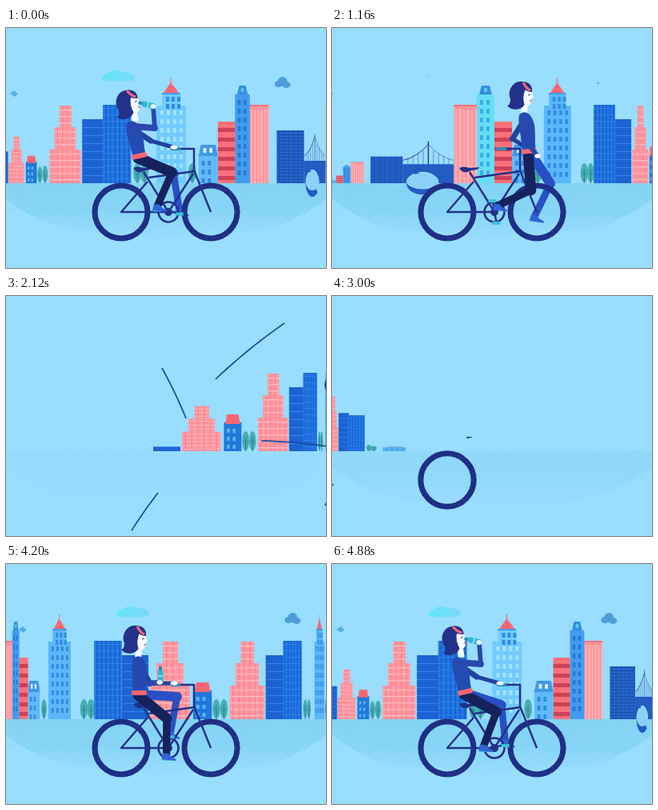
An HTML page with a canvas that plays this animation: 400 by 300 pixels, repeating every 4920 ms.

```html
<!DOCTYPE html>
<html>
<head>
<meta charset="utf-8">
<style>
html, body { margin: 0; width: 100%; height: 100%; overflow: hidden; background: #99ddff; }
canvas { display: block; width: 400px; height: 300px; }
</style>
</head>
<body>
<canvas id="stage" width="400" height="300"></canvas>
<script>
const c = document.getElementById('stage').getContext('2d');
const LOOP = 4920, STEP = 40, GROUND = 194, RING = 205, PERIOD = 797;
const NAVY = '#23318a', BLUE = '#2850c4', INK = '#16225c', RED = '#fa6670', CYAN = '#35c3dd', WHITE = '#f7fbff';

const clamp = (v, a = 0, b = 1) => Math.max(a, Math.min(b, v));
const lerp = (a, b, k) => a + (b - a) * k;
const part = (t, a, b) => clamp((t - a) / (b - a));
const smooth = k => k * k * (3 - 2 * k);
const backOut = k => k <= 0 ? 0 : 1 + 2.7 * (k - 1) ** 3 + 1.7 * (k - 1) ** 2;

function random(seed) {
  return () => (seed = (seed * 16807) % 2147483647) / 2147483647;
}

// Keys are rows of [time, value].
function track(keys, t, curved) {
  let i = 0;
  while (i < keys.length - 2 && t > keys[i + 1][0]) i++;
  const [ta, a] = keys[i], [tb, b] = keys[i + 1];
  const k = part(t, ta, tb);
  if (!curved) return lerp(a, b, k);
  const slope = n => {
    const p = keys[Math.max(0, n - 1)], q = keys[Math.min(keys.length - 1, n + 1)];
    return (q[1] - p[1]) / (q[0] - p[0]) * (tb - ta);
  };
  return lerp(a, b, smooth(k)) + k * (1 - k) * ((1 - k) * slope(i) - k * slope(i + 1));
}

function fill(color, build) {
  c.fillStyle = color;
  c.beginPath();
  build();
  c.fill();
}
function box(color, x, y, w, h) {
  c.fillStyle = color;
  c.fillRect(x, y, w, h);
}
function poly(color, ...p) {
  fill(color, () => { for (let i = 0; i < p.length; i += 2) c.lineTo(p[i], p[i + 1]); });
}
function oval(color, x, y, rx, ry = rx, turn = 0) {
  fill(color, () => c.ellipse(x, y, rx, ry, turn, 0, 7));
}
function line(color, width, ...p) {
  c.strokeStyle = color;
  c.lineWidth = width;
  c.beginPath();
  for (let i = 0; i < p.length; i += 2) c.lineTo(p[i], p[i + 1]);
  c.stroke();
}
function at(x, y, turn, sx, sy, draw) {
  c.save();
  c.translate(x, y);
  c.rotate(turn);
  c.scale(sx, sy);
  draw();
  c.restore();
}

// ---- City: drawn with the ground at y = 0, wrapped on a cylinder ----
function windows(color, x0, x1, top, bottom, gapX, gapY, w, h) {
  for (let y = top; y < bottom; y += gapY)
    for (let x = x0; x < x1; x += gapX) box(color, x, y, w, h);
}
const build = {
  step() {
    const shape = [[0, 50, 0, -42], [8, 42, -42, -70], [16, 35, -70, -97]];
    for (const [a, b, y, top] of shape) {
      box('#ff98a0', a, top, b - a, y - top);
      for (let x = a + 4; x < b; x += 8) box('#ff7b88', x, top, 1.4, y - top);
      for (let h = top + 5; h < y; h += 8) box('#ffb9bd', a, h, b - a, 1.4);
    }
  },
  block(w) {
    box('#2277e6', 0, -98, w, 98);
    for (let x = 3; x < w; x += 6) box('#185fc9', x, -98, 2, 98);
    for (let y = -94; y < 0; y += 8) box('#2f85ee', 0, y, w, .8);
  },
  low(w) {
    box('#1c63d2', 0, -80, w, 80);
    for (let y = -70; y < 0; y += 10) box('#3385eb', 0, y, w, 1);
  },
  tower(w, lit) {
    poly(RED, 9, -113, 18, -126, 28, -113);
    line(RED, 1.2, 18, -124, 18, -131);
    const wall = lit > .5 ? '#70cbff' : '#5bb7fa';
    box(wall, 7, -113, 23, 20);
    box(wall, 0, -97, w, 97);
    box('#3f9cec', 7, -113, 23, 2);
    windows(lit > .5 ? '#a0e2ff' : '#328ce2', 5, w - 3, -91, -5, 8, 11, 4, 6);
    windows('#328ce2', 12, 27, -108, -98, 7, 9, 4, 6);
  },
  house(w) {
    box('#60baf9', 0, -36, w, 36);
    poly('#4098e8', 0, -34, 3, -48, w - 3, -48, w, -34);
    windows('#d4f3ff', 6, 20, -44, -38, 8, 20, 4, 6);
    windows('#318be0', 4, 20, -28, -4, 8, 11, 4, 6);
  },
  cottage(w) {
    box('#2178db', 0, -36, w, 36);
    poly('#f46671', 2, -34, 4, -46, w - 4, -46, w - 2, -34);
    windows('#5cb5f6', 4, 20, -28, -4, 8, 10, 4, 5);
  },
  red(w) {
    box('#fb7079', 0, -77, w, 77);
    for (let y = -69; y < 0; y += 12) box('#cf4058', 0, y, w, 5);
  },
  tall(w, lit) {
    const mix = (a, b) => Math.round(lerp(a, b, lit));
    const wall = `rgb(${mix(66, 100)},${mix(155, 222)},${mix(238, 246)})`;
    box(wall, 0, -111, w, 111);
    poly('#348fe0', 3, -111, 6, -122, w - 6, -122, w - 3, -111);
    box('#5bc8ee', w / 2 - 2, -119, 4, 5);
    windows(lit > .5 ? '#3bafe2' : '#2678d2', 4, w - 3, -104, -5, 8, 11, 4, 6);
  },
  pink(w) {
    box('#ff959c', 0, -98, w, 98);
    for (let x = 2; x < w; x += 5) box('#ffb6bb', x, -92, 2, 92);
    box('#f6717e', 0, -98, w, 2);
  },
  dark(w) {
    box('#1e59bd', 0, -66, w, 66);
    for (let y = -63; y < 0; y += 4) box('#2f71d3', 0, y, w, 1);
    for (let x = 5; x < w; x += 9) box('#194daa', x, -66, 1, 66);
  },
  bridge(w) {
    fill('#235cc2', () => {
      c.rect(0, -28, w, 28);
      c.ellipse(w / 2 - 8, 0, 22, 17, 0, 0, 7, true);
    });
    oval('#8bd1f7', w / 2 - 8, -3, 22, 12);
    box('#235cc2', 0, -28, w, 10);
    line(NAVY, 1.5, w / 2, -28, w / 2, -62);
    c.lineWidth = 1;
    for (const end of [0, w]) {
      c.beginPath();
      c.moveTo(w / 2, -58);
      c.quadraticCurveTo(lerp(w / 2, end, .45), -38, end, -34);
      c.stroke();
      for (let k = .2; k < 1; k += .2) line(NAVY, .5, lerp(w / 2, end, k), -28, lerp(w / 2, end, k), -52 + 18 * k);
    }
  },
  tree(w) {
    oval('#48aeb0', w / 2, -13, w / 2, 12);
    line('#287d9c', 1, w / 2, 0, w / 2, -18);
    line('#287d9c', .7, w / 2 - 3, -14, w / 2, -9, w / 2 + 3, -13);
  }
};
const city = [
  ['bridge', -35, 70], ['dark', -88, 53], ['pink', -130, 29], ['tall', -151, 21], ['red', -174, 23],
  ['house', -199, 25], ['tree', -212, 10], ['tower', -252, 37], ['tree', -272, 10], ['tree', -281, 10],
  ['low', -350, 31], ['block', -321, 37], ['step', -402, 50], ['tree', -415, 10], ['tree', -425, 10],
  ['pink', 35, 29], ['tall', 64, 22], ['red', 86, 22], ['house', 108, 25], ['tree', 136, 10],
  ['tower', 149, 37], ['tree', 200, 11], ['tree', 210, 11], ['block', 220, 37], ['low', 257, 34],
  ['step', 293, 50], ['cottage', 347, 24]
];
const scroll = [[2840, 157], [3560, -91], [4200, -313], [4880, -544.5], [4920, -557], [5440, -712.5],
  [6080, -880], [7040, -1070], [7160, -1091]];
const fallEdge = [[4920, -65], [5440, -65], [6080, -10], [7040, 195], [7160, 300]];
const fallWidth = [[5440, 130], [6080, 155], [7040, 85]];
const riseEdge = [[2840, -10], [3560, 410], [4000, 700]];

function drawCity(T) {
  if (T > 7200) return;
  const shift = track(scroll, T, true);
  const falling = track(fallEdge, T), width = track(fallWidth, T), rising = track(riseEdge, T);
  for (const [kind, u, w] of city) {
    const start = (((u + w / 2 + shift) % PERIOD) + PERIOD * 1.5) % PERIOD - PERIOD / 2 - w / 2;
    const [a, b] = [start, start + w].map(v => 200 + RING * Math.sin(clamp(v / RING, -1.57, 1.57)));
    const mid = (a + b) / 2;
    let h = clamp((rising - mid) / 115);
    if (T > 4400) h *= clamp((mid - falling) / width);
    if (b - a < .5 || h <= 0) continue;
    const lit = 1 - part(Math.abs(mid - 172), 45, 75);
    at(a, GROUND, 0, (b - a) / w, h, () => build[kind](w, lit));
  }
}

function cloud(x, y, w, color, k) {
  if (k <= 0) return;
  at(x, y, 0, w / 40 * k, w / 40 * k, () => {
    oval(color, -4, -1, 10, 6);
    oval(color, 8, 0, 9, 5);
    fill(color, () => c.roundRect(-20, -2, 40, 8, 4));
  });
}
const drift = [[2840, 28], [3560, 0], [4200, -25], [4880, -43], [5440, -53], [6080, -63]];
function drawClouds(T) {
  const d = track(drift, T, true);
  const k = backOut(part(T, 3000, 3300)) * (1 - part(T, 5900, 6110));
  const g = c.createLinearGradient(-20, 0, 20, 0);
  g.addColorStop(0, '#62e6f3');
  g.addColorStop(1, '#7bd7fb');
  cloud(184 + d, 60, 40, g, T < 6100 ? Math.max(k, T > 5900 ? .12 : 0) : 0);
  at(375 + d * .67, 69, 0, k, k, () => {
    oval('#4d9fda', 0, -2, 6, 6);
    oval('#4d9fda', -5, 1, 5, 4);
    oval('#4d9fda', 5, 2, 5, 4);
  });
  const s = T > 5900 ? .4 + .6 * k : k;
  if (T < 6200) at(35 + d * .57, 82, 0, s, s, () => poly('#55aee7', -5, 0, 0, -4, 5, 0, 1, 4));
}

function drawGround(T) {
  c.save();
  c.globalAlpha = part(T, 2840, 3200) * (1 - .88 * part(T, 6760, 7040)) * (1 - part(T, 7040, 7160));
  const g = c.createLinearGradient(0, 194, 0, 262);
  g.addColorStop(0, '#83d3f3');
  g.addColorStop(.5, '#86d5f6');
  g.addColorStop(1, '#99ddff');
  fill(g, () => {
    c.moveTo(0, GROUND);
    c.lineTo(400, GROUND);
    c.lineTo(400, 214);
    c.bezierCurveTo(350, 252, 300, 262, 200, 262);
    c.bezierCurveTo(100, 262, 50, 252, 0, 214);
  });
  const r = random(77);
  for (let i = 0; i < 1100; i++) {
    const x = r() * 400, y = GROUND + 2 + r() * 62 * Math.sqrt(1 - ((x - 200) / 230) ** 2);
    box(i % 2 ? '#9ce2fc' : '#79cbed', x, y, .8, .8);
  }
  c.restore();
}

// ---- Bike ----
const crankTurn = [[3560, -90], [3800, -90], [4200, -80], [4900, 360], [5440, 640], [6080, 800], [6400, 810]];
const crankAngle = T => track(crankTurn, T) * Math.PI / 180;
function pedal(T, side) {
  const a = crankAngle(T) + side * Math.PI;
  return [203 + 14 * Math.cos(a), 229 + 14 * Math.sin(a)];
}
function wheel() {
  c.strokeStyle = '#1e2d82';
  c.lineWidth = 7;
  c.beginPath();
  c.arc(0, 0, 33, 0, 7);
  c.stroke();
  const r = random(9);
  for (let i = 0; i < 130; i++) {
    const a = r() * 6.28, d = 30 + r() * 6;
    box('#3450b5', d * Math.cos(a), d * Math.sin(a), .8, .8);
  }
}
function tubes(k, ...p) {
  let len = 0;
  for (let i = 2; i < p.length; i += 2) len += Math.hypot(p[i] - p[i - 2], p[i + 1] - p[i - 1]);
  c.setLineDash([len * k, len]);
  if (k > 0) line(NAVY, 2.4, ...p);
  c.setLineDash([]);
}
// A part pops in at its own time and later flies off, shrinking.
function piece(T, x, y, from, span, ease, goal, draw) {
  const out = part(T, 6680, 7020) ** 1.6;
  const k = ease(part(T, from, from + span)) * (1 - out);
  if (k > 0) at(lerp(x, goal[0], out), lerp(y, goal[1], out), 0, k, k, draw);
}
function drawBike(T) {
  piece(T, 144, 230, 2880, 320, backOut, [157, 285], wheel);
  piece(T, 256, 230, 3600, 260, smooth, [390, 187], wheel);
  const k = part(T, 3100, 3680);
  piece(T, 203, 210, 2900, 1, x => x, [300, 160], () => {
    c.translate(-203, -210);
    tubes(k, 203, 230, 144, 230, 177, 192);
    tubes(k, 172, 180, 203, 230);
    tubes(k, 178, 187, 236, 179);
    tubes(part(T, 3560, 3760), 234, 182, 203, 230);
    tubes(k, 235, 178, 256, 230);
  });
  piece(T, 172, 177, 2980, 260, backOut, [195, 92], () => fill(NAVY, () => {
    c.moveTo(-13, -2);
    c.quadraticCurveTo(-8, -5, 0, -2);
    c.lineTo(12, -3);
    c.quadraticCurveTo(12, 0, 2, 1);
    c.quadraticCurveTo(-8, 7, -13, -2);
  }));
  piece(T, 235, 179, 3570, 200, smooth, [346, 36], () => {
    line(NAVY, 2.4, 0, 0, 0, -28, -29, -28);
    line('#2d8fb5', 4, -29, -28, -17, -28);
  });
  if (T > 3100) {
    const fly = Math.max(0, (T - 6680) / 360), s = backOut(part(T, 3100, 3360));
    const a = crankAngle(T);
    at(lerp(203, 412, fly), lerp(230, 111, fly), a, s, s, () => {
      c.strokeStyle = NAVY;
      c.lineWidth = 2.6;
      c.beginPath();
      c.arc(0, 0, 12.5, 0, 7);
      c.stroke();
      oval(NAVY, 0, 0, 5);
    });
    const dx = 200 * fly, dy = 28 * fly;
    const [p, q] = [pedal(T, 0), pedal(T, 1)];
    if (fly === 0) {
      line(NAVY, 2.4, ...p, ...q);
      for (const [x, y] of [p, q]) box(CYAN, x - 5, y - 1, 10, 4);
    } else line(NAVY, 2, 199 + dx, 234 + dy, 205 + dx, 222 + dy);
  }
}

const trails = [[225, 153, 213, 123, 195, 90], [262, 104, 302, 66, 348, 34],
  [319, 181, 360, 182, 402, 188], [190, 246, 173, 268, 157, 293]];
function drawTrails(T) {
  const head = part(T, 6800, 7040), tail = smooth(part(T, 7080, 7700));
  if (head <= tail) return;
  c.strokeStyle = '#20479f';
  c.lineWidth = 1.7;
  for (const [x, y, mx, my, ex, ey] of trails) {
    c.beginPath();
    for (let i = 0; i <= 12; i++) {
      const k = lerp(tail, head, i / 12), j = 1 - k;
      c.lineTo(j * j * x + 2 * j * k * mx + k * k * ex, j * j * y + 2 * j * k * my + k * k * ey);
    }
    c.stroke();
  }
}

// ---- Rider ----
// time, head, tilt, bottle angle, hip, near hand, far hand, then feet when off the pedals
const poses = [
  [3000, -60, 90, 0, 0, -71, 153, -46, 149, -50, 148, -10, 234, -128, 214],
  [3280, 28, 88, 0, 0, 17, 151, 42, 147, 38, 148, 70, 234, -40, 214],
  [3560, 117, 90, 0, 0, 107, 153, 132, 149, 128, 148, 50, 216, 162, 235],
  [3800, 160, 92, 0, 0, 166, 160, 205, 149, 209, 149],
  [4200, 160, 93, 0, 0, 166, 161, 192, 148, 209, 149],
  [4700, 151, 94, -14, -76, 166, 160, 184, 98, 209, 149],
  [5060, 151, 94, -14, -76, 166, 160, 184, 98, 209, 149],
  [5440, 158, 93, 0, -45, 167, 160, 194, 116, 209, 150],
  [5680, 166, 92, 0, 0, 176, 160, 200, 148, 209, 150],
  [6080, 235, 83, 0, 0, 246, 154, 257, 160, 250, 154, 207, 226, 253, 240],
  [6640, 440, 90, 0, 0, 430, 153, 455, 149, 451, 148, 490, 234, 373, 214]
];
function poseAt(T) {
  let i = 0;
  while (i < poses.length - 2 && T > poses[i + 1][0]) i++;
  const full = p => p.length > 11 ? p : [...p, ...pedal(T, 1), ...pedal(T, 0)];
  const a = full(poses[i]), b = full(poses[i + 1]);
  const k = part(T, a[0], b[0]);
  const seated = T > 3800 && T < 5680;
  return a.map((v, n) => lerp(v, b[n], seated ? smooth(k) : k));
}
function limb(color, width, x, y, ex, ey, len, bend) {
  const dx = ex - x, dy = ey - y, d = Math.hypot(dx, dy) || 1;
  const h = Math.sqrt(Math.max(0, len * len - d * d / 4)) * bend / d;
  const jx = x + dx / 2 + dy * h, jy = y + dy / 2 - dx * h;
  c.lineCap = c.lineJoin = 'round';
  line(color, width, x, y, jx, jy);
  line(color, width * .72, jx, jy, ex, ey);
  c.lineCap = 'butt';
}
function shoe(x, y, turn) {
  at(x, y, turn, 1, 1, () => fill('#3063d6', () => {
    c.moveTo(-5, -6);
    c.lineTo(2, -6);
    c.quadraticCurveTo(5, -2, 12, 0);
    c.lineTo(12, 2);
    c.lineTo(-6, 2);
  }));
}
function head(x, y, tilt) {
  at(x, y, tilt * Math.PI / 180, 1, 1, () => {
    poly(WHITE, 3, 8, 10, 10, 9, 25, 1, 25);
    fill(NAVY, () => {
      c.moveTo(9, -14);
      c.bezierCurveTo(-6, -22, -17, -6, -12, 6);
      c.quadraticCurveTo(-12, 13, -16, 14);
      c.bezierCurveTo(-9, 22, 3, 19, 6, 12);
      c.lineTo(13, -4);
    });
    fill(WHITE, () => {
      c.moveTo(7, -7);
      c.quadraticCurveTo(2, 4, 6, 14);
      c.quadraticCurveTo(13, 16, 14, 9);
      c.lineTo(14, 5);
      c.lineTo(17, 4);
      c.lineTo(14, -5);
    });
    fill(NAVY, () => {
      c.moveTo(5, -16);
      c.quadraticCurveTo(16, -14, 15, -3);
      c.quadraticCurveTo(8, -3, 4, -8);
    });
    c.strokeStyle = RED;
    c.lineWidth = 3;
    c.beginPath();
    c.moveTo(4, -15);
    c.quadraticCurveTo(8, -7, 13, -5);
    c.stroke();
    line(NAVY, 1, 10, 1, 13, 0);
    oval(RED, 13.5, 8, 1.4, 1);
  });
}
function drawRider(T, front) {
  if (T < 3000 || T > 6640) return;
  const [, hx, hy, tilt, flask, px, py, ax, ay, bx, by, dx, dy, fx, fy] = poseAt(T);
  if (!front) {
    limb(BLUE, 12, px + 2, py + 2, fx, fy - 4, 46, 1);
    shoe(fx, fy, 0.15);
    return;
  }
  const sx = hx + 6, sy = hy + 26;
  limb(INK, 13, px - 1, py + 3, dx, dy - 4, 46, 1);
  shoe(dx, dy, dx < px - 45 && T < 3700 ? 1.2 : 0.1);
  limb('#2242a0', 7, sx, sy + 5, bx, by, 29, -1);
  oval(WHITE, bx + 1, by, 4.5, 2.6);
  const lean = Math.atan2(sx - px, py - sy), len = Math.hypot(px - sx, py - sy);
  head(hx, hy, tilt);
  at(px, py, lean, 1, 1, () => {
    fill('#254bb2', () => {
      c.moveTo(-8, 2);
      c.bezierCurveTo(-6, -len * .4, -11, -len * .7, -7, -len - 1);
      c.quadraticCurveTo(0, -len - 7, 6, -len);
      c.bezierCurveTo(15, -len * .7, 8, -len * .4, 9, 2);
    });
    fill(RED, () => c.roundRect(-9, -3, 19, 6, 2));
  });
  limb('#2848ad', 8, sx + 2, sy + 3, ax, ay, 27, -1);
  if (T > 3920 && T < 5660) at(ax + 1, ay, flask * Math.PI / 180, 1, 1, () => {
    fill('#32b6d4', () => c.roundRect(-3.5, -15, 7, 17, 2));
    box('#248eb8', -2, -20, 4, 5);
    box('#79e1e8', -3.5, -9, 7, 2);
  });
  oval(WHITE, ax, ay, 3.6, 2.8);
}

function draw(t) {
  const T = t < 2840 ? t + LOOP : t;
  c.fillStyle = '#99ddff';
  c.fillRect(0, 0, 400, 300);
  drawGround(T);
  drawClouds(T);
  drawCity(T);
  drawRider(T, false);
  drawBike(T);
  drawRider(T, true);
  drawTrails(T);
}
const began = performance.now();
function tick(now) {
  const t = Math.max(0, now - began) % LOOP;
  draw(Math.floor(t / STEP) * STEP);
  requestAnimationFrame(tick);
}
draw(0);
requestAnimationFrame(tick);
</script>
</body>
</html>
```
